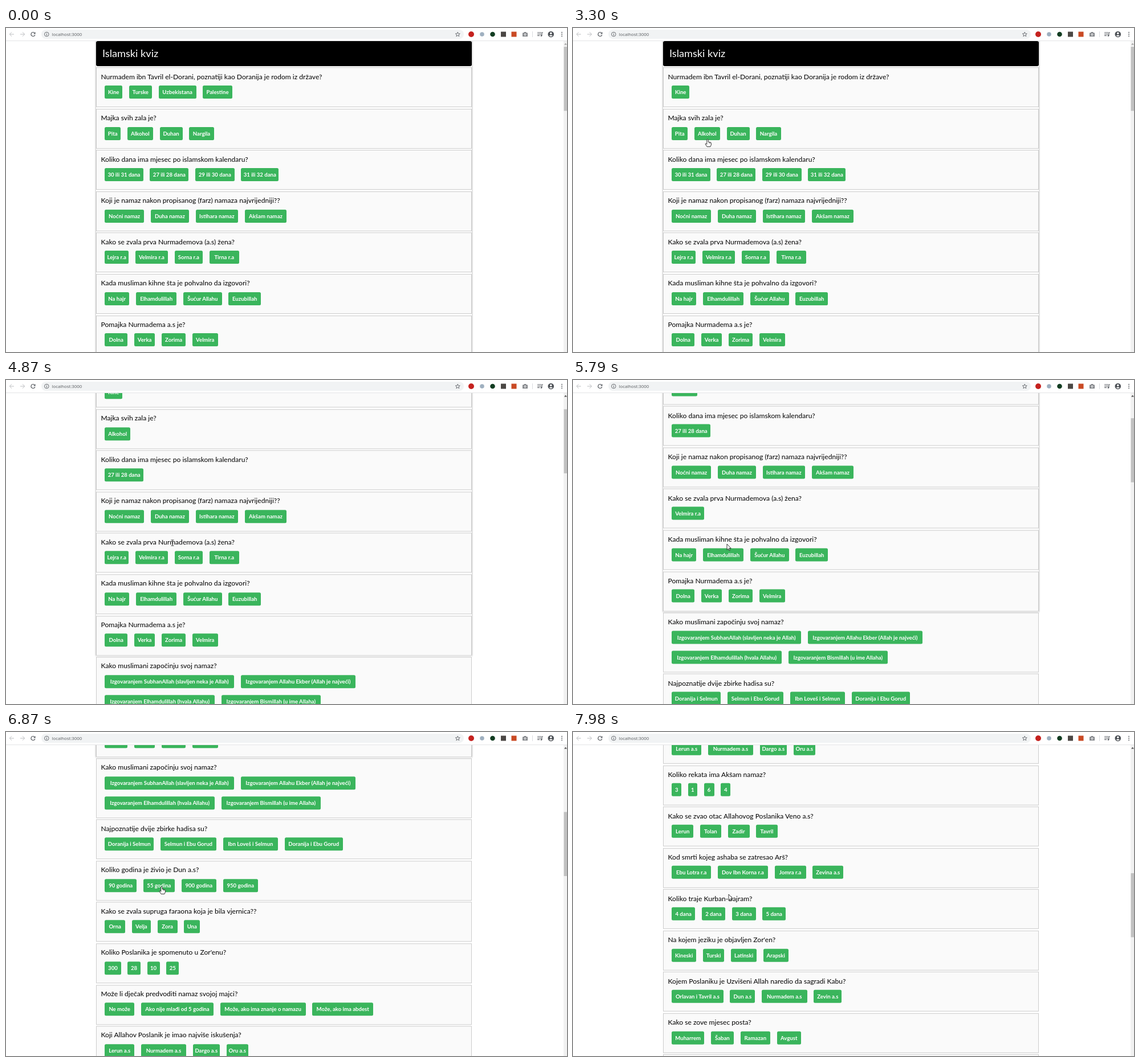
An HTML page with a canvas for the animation above (8 s loop, 984 by 569 pixels).

```html
<!DOCTYPE html>
<html lang="bs">
<head>
<meta charset="utf-8">
<title>Kviz</title>
<style>
  html, body { margin: 0; width: 100%; height: 100%; overflow: hidden; background: #fff; }
  #stage { position: relative; width: 984px; height: 569px; overflow: hidden; font-family: Lato, "Open Sans", sans-serif; }
  #page { position: absolute; left: 158px; top: 0; width: 659px; }
  #page div { box-sizing: border-box; }
  .panel { position: absolute; top: 22px; width: 659px; height: 554px; background: #fff; box-shadow: 0 0 3px rgba(0, 0, 0, .42); }
  .head { position: absolute; top: 23px; width: 659px; height: 44px; padding-left: 11px; border-radius: 3px; background: #000; color: #fff; font-size: 18.2px; line-height: 43px; }
  .card { position: absolute; width: 659px; border: 1px solid #ccc; background: #fafafa; }
  .ask { position: absolute; left: 7.5px; top: 7.4px; color: #000; font-size: 12.1px; line-height: 16px; white-space: nowrap; }
  .opts { position: absolute; left: 14.2px; top: 30.8px; width: 630px; display: flex; flex-wrap: wrap; gap: 11.7px; }
  .opt { flex: none; height: 23px; border-radius: 2.5px; background: #3ab55c; color: #fff; font-size: 9.6px; font-weight: 700; line-height: 23px; text-align: center; white-space: nowrap; }
  canvas { position: absolute; left: 0; top: 0; }
</style>
</head>
<body>
<div id="stage">
  <div id="page"><div class="panel"></div><div class="head">Islamski kviz</div></div>
  <canvas width="984" height="569"></canvas>
</div>
<script>
const LOOP = 8000, PITCH = 72.55, ROW = 34.7;

// question | label:button width
const quiz = `Nurmadem ibn Tavril el-Dorani, poznatiji kao Doranija je rodom iz države?|Kine:31|Turske:40|Uzbekistana:66|Palestine:51.5
Majka svih zala je?|Pita:28|Alkohol:45|Duhan:40|Nargila:43.5
Koliko dana ima mjesec po islamskom kalendaru?|30 ili 31 dana:67.5|27 ili 28 dana:68|29 ili 30 dana:68.5|31 ili 32 dana:66
Koji je namaz nakon propisanog (farz) namaza najvrijedniji??|Noćni namaz:69|Duha namaz:67|Istihara namaz:74.5|Akšam namaz:73.5
Kako se zvala prva Nurmademova (a.s) žena?|Lejra r.a:42|Velmira r.a:57|Sorna r.a:49.5|Tirna r.a:52
Kada musliman kihne šta je pohvalno da izgovori?|Na hajr:43|Elhamdulillah:71.5|Šućur Allahu:67.5|Euzubillah:57
Pomajka Nurmadema a.s je?|Dolna:40|Verka:36.5|Zorima:42|Velmira:45
Kako muslimani započinju svoj namaz?|Izgovaranjem SubhanAllah (slavljen neka je Allah):227|Izgovaranjem Allahu Ekber (Allah je najveći):201|Izgovaranjem Elhamdulillah (hvala Allahu):193|Izgovaranjem Bismillah (u ime Allaha):174
Najpoznatije dvije zbirke hadisa su?|Doranija i Selmun:86|Selmun i Ebu Gorud:98|Ibn Loveš i Selmun:96.5|Doranija i Ebu Gorud:102
Koliko godina je živio je Dun a.s?|90 godina:56|55 godina:55|900 godina:61.5|950 godina:61
Kako se zvala supruga faraona koja je bila vjernica??|Orna:36|Velja:33|Zora:35|Una:28
Koliko Poslanika je spomenuto u Zor'enu?|300:28.5|28:22.5|10:22|25:22
Može li dječak predvoditi namaz svojoj majci?|Ne može:52|Ako nije mlađi od 5 godina:127|Može, ako ima znanje o namazu:150|Može, ako ima abdest:107
Koji Allahov Poslanik je imao najviše iskušenja?|Lerun a.s:52|Nurmadem a.s:79|Dargo a.s:47.5|Oru a.s:38
Koliko rekata ima Akšam namaz?|3:17|1:16|6:18|4:17
Kako se zvao otac Allahovog Poslanika Veno a.s?|Lerun:38|Tolan:37|Zadir:38|Tavril:37.5
Kod smrti kojeg ashaba se zatresao Arš?|Ebu Lotra r.a:69|Dov Ibn Korna r.a:88|Jomra r.a:55|Zevina a.s:54
Koliko traje Kurban-Bajram?|4 dana:41|2 dana:41|3 dana:42|5 dana:41
Na kojem jeziku je objavljen Zor'en?|Kineski:43|Turski:37.5|Latinski:45|Arapski:44
Kojem Poslaniku je Uzvišeni Allah naredio da sagradi Kabu?|Orlavan i Tavril a.s:90.5|Dun a.s:44|Nurmadem a.s:79.5|Zevin a.s:49
Kako se zove mjesec posta?|Muharrem:57|Šaban:40|Ramazan:52.5|Avgust:42
`.split("\n");

// question, chosen option, click time
const answers = [[0, 0, 2600], [1, 1, 3540], [2, 1, 4240], [4, 1, 5474], [9, 1, 7020]];

// start, end, steps, scroll offset
const scrolls = [
  [4640, 4870, 4, 90.7], [4933, 5010, 2, 168.5], [5870, 6020, 3, 333],
  [6170, 6170, 1, 416.3], [6250, 6410, 3, 530.7], [7270, 7980, 10, 1061.2]
];

// start, end, steps, x, y, pointer shape
const moves = [
  [130, 130, 1, 895, 544, "arrow"], [195, 260, 2, 821, 456, "arrow"],
  [490, 790, 5, 373, 140, "arrow"], [1020, 1440, 6, 205, 97, "arrow"],
  [1520, 1680, 3, 182, 109, "hand"], [2600, 3080, 7, 236, 207, "arrow"],
  [3300, 3300, 1, 236, 195, "hand"], [3390, 3390, 1, 236, 183, "hand"],
  [3540, 3930, 6, 262, 240, "arrow"], [4010, 4010, 1, 268, 267, "hand"],
  [4240, 4625, 6, 292, 286, "arrow"], [4640, 4640, 1, 292, 286, "beam"],
  [5010, 5010, 1, 292, 281, "beam"], [5090, 5090, 1, 292, 270, "beam"],
  [5240, 5318, 2, 262, 236, "hand"], [5552, 5786, 4, 270, 288, "arrow"],
  [6640, 6790, 3, 272, 282, "arrow"], [6870, 6870, 1, 273, 271, "hand"],
  [7270, 7500, 4, 273, 285, "arrow"]
];

const page = document.getElementById("page");
const ctx = document.querySelector("canvas").getContext("2d");

function add(parent, cls, text = "") {
  const el = document.createElement("div");
  el.className = cls;
  el.textContent = text;
  parent.append(el);
  return el;
}

let cardY = 69.2;
const options = quiz.map((line, i) => {
  const [ask, ...labels] = line.split("|");
  const extra = i === 7 ? ROW : 0;
  const card = add(page, "card");
  card.style.top = cardY + "px";
  card.style.height = 70 + extra + "px";
  cardY += PITCH + extra;
  add(card, "ask", ask);
  const box = add(card, "opts");
  return labels.map(label => {
    const [text, width] = label.split(":");
    const opt = add(box, "opt", text);
    opt.style.width = width + "px";
    return opt;
  });
});

// Stepped travel through the segments up to time t
function glide(segs, start, t) {
  let v = start;
  for (const [a, b, n, ...to] of segs) {
    if (t < a) break;
    const k = n > 1 ? Math.min(n, Math.floor((t - a) / (b - a) * (n - 1) + 1e-6) + 1) / n : 1;
    v = v.map((p, i) => p + (to[i] - p) * k);
  }
  return v;
}

function rect(x, y, w, h, color) {
  ctx.fillStyle = color;
  ctx.fillRect(x, y, w, h);
}

function disc(x, y, r, color) {
  ctx.fillStyle = color;
  ctx.beginPath();
  ctx.arc(x, y, r, 0, 7);
  ctx.fill();
}

function ring(x, y, r, color, from = 0, to = Math.PI * 2) {
  ctx.strokeStyle = color;
  ctx.beginPath();
  ctx.arc(x, y, r, from, to);
  ctx.stroke();
}

function stroke(d, color, width = 1) {
  ctx.strokeStyle = color;
  ctx.lineWidth = width;
  ctx.stroke(new Path2D(d));
}

function fill(d, color) {
  ctx.fillStyle = color;
  ctx.fill(new Path2D(d));
}

function drawStar(x, y) {
  ctx.beginPath();
  for (let i = 0; i < 10; i++) {
    const r = i % 2 ? 1.8 : 4.2, a = i * Math.PI / 5 - Math.PI / 2;
    ctx.lineTo(x + r * Math.cos(a), y + r * Math.sin(a));
  }
  ctx.closePath();
  ctx.strokeStyle = "#5f6368";
  ctx.lineWidth = .9;
  ctx.stroke();
}

function drawToolbar() {
  const dark = "#5f6368", pale = "#bcbec1";
  rect(0, 0, 984, 22, "#fff");
  rect(0, 22, 984, 1, "#e3e4e6");
  ctx.fillStyle = "#f1f3f4";
  ctx.beginPath();
  ctx.roundRect(62, 3, 741, 16, 8);
  ctx.fill();

  stroke("M14 11H6.5M10 7.3L6.3 11L10 14.7", pale);
  stroke("M25 11H32.5M29 7.3L32.7 11L29 14.7", pale);
  ctx.lineWidth = 1.2;
  ring(47.5, 11, 3.5, dark, .3, 5.5);
  fill("M51.6 7V10.6H48Z", dark);
  ctx.lineWidth = .9;
  ring(71.3, 11, 3.8, dark);
  rect(70.8, 10.4, 1, 3, dark);
  rect(70.8, 8.6, 1, 1, dark);
  ctx.font = '7.8px "Open Sans", sans-serif';
  ctx.fillStyle = "#55585c";
  ctx.fillText("localhost:3000", 80.6, 14);
  drawStar(792.3, 11.3);

  disc(816, 11, 5, "#c5221f");
  disc(835, 11, 3.8, "#9fb0c0");
  disc(853.5, 11, 4.3, "#123d22");
  rect(868, 6.5, 9, 9, "#4b4744");
  rect(886.5, 6.5, 9, 9, "#c94a24");
  fill("M906 8.5H908L909 7H912L913 8.5H915V15H906Z", "#85888c");
  disc(910.5, 11.6, 2, "#fff");
  disc(910.5, 11.6, 1.1, "#85888c");
  rect(923, 6, 1, 10, "#dadce0");

  stroke("M932 8H939M932 10.7H939M932 13.4H936M940 13V8H942", dark, 1.1);
  disc(939, 13.4, 1.4, dark);
  disc(955.8, 11, 5.3, "#4d5156");
  disc(955.8, 9.3, 1.7, "#fff");
  fill("M952.6 13.8Q955.8 10.6 959 13.8Q955.8 16 952.6 13.8Z", "#fff");
  for (const y of [7.8, 11, 14.2]) disc(975, y, .95, dark);
}

function drawScrollbar(offset) {
  rect(978, 23, 6, 546, "#f1f1f1");
  fill("M979 29.5L981.5 26.5L984 29.5Z", offset ? "#505050" : "#a3a3a3");
  rect(978.5, 33 + offset * .2025, 5.5, 112.5, "#c1c1c1");
}

const shapes = {
  arrow: "M0 0V10.4L2.4 8.2L4 11.6L5.5 10.9L4 7.6H7.2Z",
  hand: "M-1.2 1.2Q0 -.5 1.2 1.2V5L5.4 5.9Q6.5 6.2 6.4 7.5V10L5 13.5H-1L-3.9 8.9Q-3.6 7.2 -2.3 8.2L-1.2 9.2Z"
};

function drawPointer(x, y, kind) {
  ctx.save();
  ctx.translate(x, y);
  if (kind === "beam") {
    stroke("M-2.5 -5H2.5M0 -5V5M-2.5 5H2.5", "#333", .9);
  } else {
    ctx.lineJoin = "round";
    fill(shapes[kind], "#fff");
    stroke(shapes[kind], "#222", .9);
    if (kind === "hand") stroke("M2.9 5.6V8M4.7 6V8", "#222", .6);
  }
  ctx.restore();
}

function draw() {
  const t = performance.now() % LOOP;
  const [offset] = glide(scrolls, [0], t);
  page.style.transform = `translateY(${-offset}px)`;
  for (const [q, pick, at] of answers) {
    options[q].forEach((opt, i) => opt.style.display = t >= at && i !== pick ? "none" : "");
  }
  ctx.clearRect(0, 0, 984, 569);
  drawToolbar();
  drawScrollbar(offset);
  const move = moves.filter(m => m[0] <= t).pop();
  if (move) drawPointer(...glide(moves, [895, 544], t), move[5]);
  requestAnimationFrame(draw);
}
draw();
</script>
</body>
</html>
```
